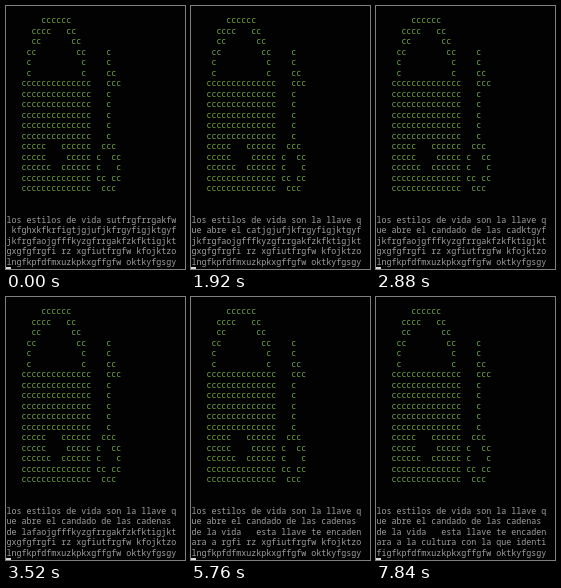
Write an HTML page that moves like this. It is 179 by 263 pixels and loops after 8 s.

```html
<!DOCTYPE html>
<html lang="es">
<head>
<meta charset="utf-8">
<title>Candado</title>
<style>
html, body { margin: 0; width: 100%; height: 100%; overflow: hidden; background: #020202; }
svg { display: block; width: 100%; height: 100%; }
text { font: 8.333px "Noto Sans Mono", monospace; white-space: pre; }
#lock { fill: #70a545; }
#message { fill: #a0a0a0; }
#cursor { fill: #d8d8d8; }
</style>
</head>
<body>
<svg viewBox="0 0 179 263" preserveAspectRatio="none">
  <g id="lock"></g>
  <g id="message"></g>
  <rect id="cursor" x="0" y="261" width="5" height="2"/>
</svg>
<script>
const LOOP = 8000, STEP = 160, COLUMNS = 34, ROW_HEIGHT = 10.5;
const body = 'c'.repeat(14);
const shaft = `   ${body}   c`;

const lock = [
  '       cccccc',
  '     cccc   cc',
  '     cc      cc',
  '    cc        cc    c',
  '    c          c    c',
  '    c          c    cc',
  `   ${body}   ccc`,
  shaft, shaft, shaft, shaft, shaft,
  '   ccccc   cccccc  ccc',
  '   ccccc    ccccc c  cc',
  '   cccccc  cccccc c   c',
  `   ${body} cc cc`,
  `   ${body}  ccc`
];

const plain =
  'los estilos de vida son la llave q' +
  'ue abre el candado de las cadenas ' +
  'de la vida   esta llave te encaden' +
  'ara a la cultura con la que identi' +
  'fi';

const cipher =
  'los estilos de vida sutfrgfrrgakfw' +
  ' kfghxkfkrfigtjgjufjkfrgyfigjktgyf' +
  'jkfrgfaojgfffkyzgfrrgakfzkfktigjkt' +
  'gxgfgfrgfi rz xgfiutfrgfw kfojktzo' +
  'lngfkpfdfmxuzkpkxgffgfw oktkyfgsgy';

// [step, letters already deciphered]
const progress = [[0, 21], [1, 21], [12, 47], [14, 53], [22, 73], [28, 88], [36, 108], [49, 138]];

function addRow(parent, row, content = '') {
  const text = document.createElementNS('http://www.w3.org/2000/svg', 'text');
  text.setAttribute('x', 0.4);
  text.setAttribute('y', 17.4 + row * ROW_HEIGHT);
  text.textContent = content;
  parent.append(text);
  return text;
}

function decipheredAt(step) {
  const next = Math.max(1, progress.findIndex(([s]) => s >= step));
  const [s0, n0] = progress[next - 1], [s1, n1] = progress[next];
  return Math.floor(n0 + (n1 - n0) * (step - s0) / (s1 - s0));
}

const lockGroup = document.getElementById('lock');
const messageGroup = document.getElementById('message');
lock.forEach((content, row) => addRow(lockGroup, row, content));
const lines = Array.from({ length: 5 }, (_, i) => addRow(messageGroup, 19 + i));

let shown = -1;
function draw() {
  const step = Math.floor(performance.now() % LOOP / STEP);
  if (step !== shown) {
    shown = step;
    const count = decipheredAt(step);
    const message = plain.slice(0, count) + cipher.slice(count);
    lines.forEach((line, i) => {
      line.textContent = message.slice(i * COLUMNS, (i + 1) * COLUMNS);
    });
  }
  requestAnimationFrame(draw);
}
draw();
</script>
</body>
</html>
```
